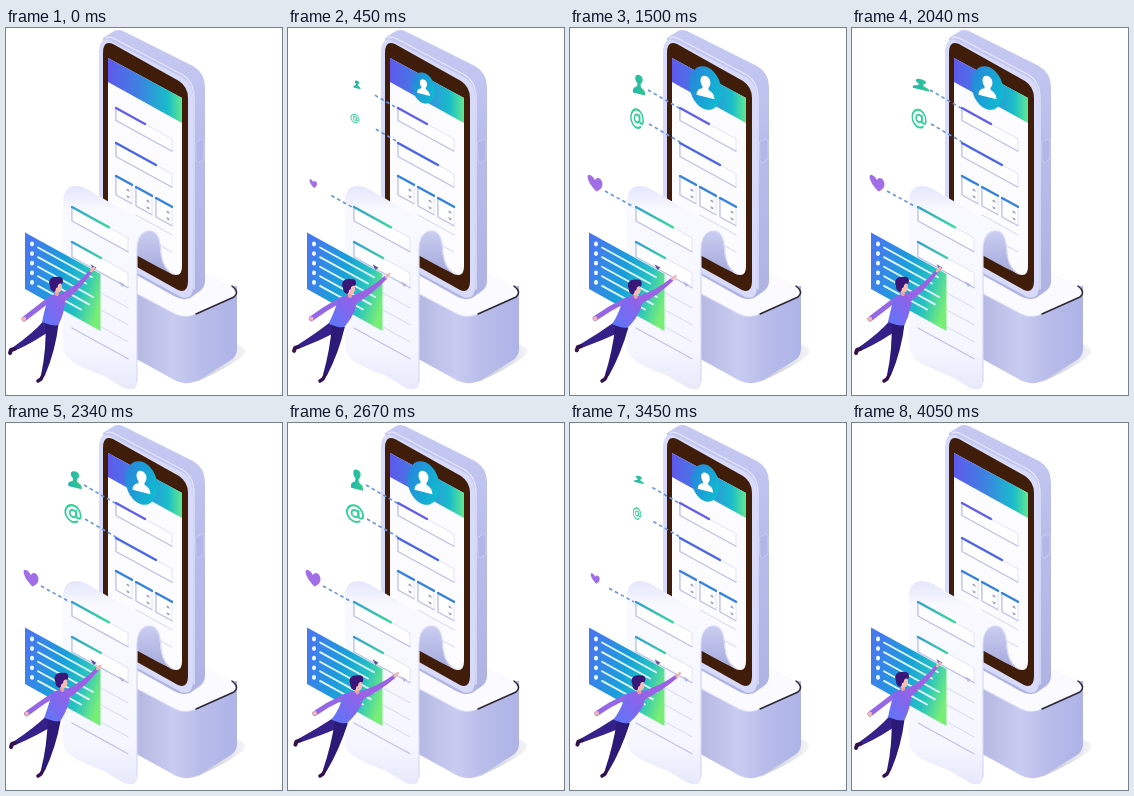
These frames come from a looping animation (276 px wide and 367 px high, 4080 ms). An HTML page:

```html
<!DOCTYPE html>
<html lang="en">
<head>
<meta charset="utf-8">
<title>Filling in a phone form</title>
<style>
  html, body { margin: 0; width: 100%; height: 100%; overflow: hidden; background: #fff; }
  svg { display: block; width: 100%; height: 100%; }
</style>
</head>
<body>
<svg id="stage" viewBox="0 0 276 367" fill="none" stroke-linecap="round" stroke-linejoin="round">
  <defs>
    <linearGradient id="side" x1="0" y1="0" x2="0" y2="1">
      <stop stop-color="#c6caf2"/><stop offset=".4" stop-color="#b9bdec"/><stop offset="1" stop-color="#aeb3e4"/>
    </linearGradient>
    <linearGradient id="header">
      <stop stop-color="#5f58ec"/><stop offset=".45" stop-color="#3a86e0"/>
      <stop offset=".8" stop-color="#18bccb"/><stop offset="1" stop-color="#5fe890"/>
    </linearGradient>
    <linearGradient id="card" x1="0" y1=".3" x2="1" y2=".7">
      <stop stop-color="#4679ef"/><stop offset=".45" stop-color="#189fd9"/>
      <stop offset=".75" stop-color="#27c3c0"/><stop offset="1" stop-color="#78ee76"/>
    </linearGradient>
    <linearGradient id="badge" x1="0" y1="0" x2="1" y2=".5">
      <stop stop-color="#2a80de"/><stop offset="1" stop-color="#10b8d0"/>
    </linearGradient>
    <linearGradient id="boxFace">
      <stop stop-color="#b2b5df"/><stop offset=".4" stop-color="#c9ccf1"/>
      <stop offset=".65" stop-color="#b9bdea"/><stop offset="1" stop-color="#aeb3e8"/>
    </linearGradient>
    <linearGradient id="curl" x1="0" y1="0" x2="0" y2="1">
      <stop stop-color="#cdd0f2"/><stop offset="1" stop-color="#a3a8db"/>
    </linearGradient>
    <linearGradient id="paper" x1="0" y1="0" x2="0" y2="1">
      <stop stop-color="#e4e6fc"/><stop offset=".12" stop-color="#f9f9ff"/>
      <stop offset=".8" stop-color="#f5f6ff"/><stop offset="1" stop-color="#e7e9fb"/>
    </linearGradient>
    <linearGradient id="coat" x1="1" y1="0" x2="0" y2="1">
      <stop stop-color="#9a60e4"/><stop offset=".45" stop-color="#7c69ef"/><stop offset="1" stop-color="#5b78fa"/>
    </linearGradient>
    <linearGradient id="shadow">
      <stop stop-color="#c4c5d0"/><stop offset="1" stop-color="#f4f4f8"/>
    </linearGradient>
    <linearGradient id="userInk">
      <stop stop-color="#1fb5b0"/><stop offset="1" stop-color="#35ca88"/>
    </linearGradient>
    <linearGradient id="ink" gradientUnits="userSpaceOnUse" x1="66" y1="0" x2="103" y2="0">
      <stop stop-color="#309fd0"/><stop offset="1" stop-color="#3cdc9b"/>
    </linearGradient>
  </defs>

  <!-- stand -->
  <path fill="url(#shadow)" d="M190 354L229 316Q241 319 239 325Q232 335 190 354Z"/>
  <path fill="url(#boxFace)" d="M125 258H231V321Q231 328 225 332L196 350Q188 356 178 355Q170 354 163 349L125 328Z"/>
  <path fill="#fbfbff" d="M125 247L190 243Q196 242 202 246L226 258Q234 264 228 269L190 286Q179 291 169 286L125 263Z"/>
  <path stroke="#dcdef8" d="M190 286Q179 291 169 286L130 265"/>
  <path stroke="#2c2734" stroke-width="1.5" d="M226 258Q234 264 228 269L190 286"/>

  <!-- phone -->
  <path fill="url(#side)" d="M97 10L108 3Q112 1 117 3L187 38Q199 45 199 59V253Q199 259 194 263L184 270Q176 273 168 268L100 230Z"/>
  <path fill="#d7daf8" d="M93 25Q93 10 103 12L176 49Q187 55 187 71V258Q187 273 175 269L93 224Z"/>
  <path stroke="#e6e8fc" stroke-width="1.2" d="M100 10Q104 8 109 11L177 47Q188 54 188 70V261"/>
  <path fill="#401d0a" d="M97 25Q97 12 107 16L173 53Q182 59 182 70V253Q182 266 172 262L97 220Z"/>
  <path fill="#fcfcff" d="M102 30L176 70V238Q176 250 166 246L102 211Z"/>
  <path fill="url(#header)" d="M102 30L176 70V95L102 54Z"/>
  <path fill="#b2b6e8" stroke="#c8cbf2" d="M190 114L196 111Q198 111 198 114V131L192 135Q190 135 190 132Z"/>
  <g id="screenForm"></g>

  <!-- paper -->
  <path fill="url(#curl)" d="M130 212Q133 201 144 201Q153 203 154 220Q155 238 167 246Q160 243 154 240L130 227Z"/>
  <path fill="url(#paper)" d="M57 174Q57 158 70 158Q76 158 81 161L149 201Q154 204 155 214Q149 200 139 204Q131 208 131 222V356Q130 364 118 360Q108 354 98 348Q82 342 70 336Q57 329 57 318Z"/>
  <path stroke="#d5d7f5" stroke-width="1.2" d="M131 222V354M131 222Q131 208 139 204Q149 200 153 212Q155 218 155 225Q157 242 167 246"/>
  <g id="paperForm"></g>

  <!-- option list -->
  <path fill="url(#card)" d="M19 204.5L94.500 246V303L19 261Z"/>
  <g id="options"></g>

  <!-- callouts -->
  <g id="leads" stroke="#6595e4" stroke-width="1.6" stroke-dasharray="3.6 3" stroke-linecap="butt"></g>
  <g id="user" fill="url(#userInk)">
    <path d="M0-10C6-10 5-3 2-1V1Q2 3 5 4Q8 6 7 10H-7Q-8 6-5 4Q-2 3-2 1V-1C-5-3-6-10 0-10Z"/>
  </g>
  <g id="at" stroke="#35cf98" stroke-width="2">
    <circle r="3.6"/>
    <path d="M3.6-3.6V1.4a2.4 2.4 0 0 0 4.8 0V0A8.4 8.4 0 1 0 4.8 7"/>
  </g>
  <path id="heart" fill="#a26ee8" d="M0 8C-4 5-8 1-8-4C-8-9-2-9 0-4C2-9 8-9 8-4C8 1 4 5 0 8Z"/>
  <g id="avatar">
    <ellipse rx="16" ry="21.500" fill="url(#badge)"/>
    <path fill="#fff" d="M0-12C6-12 6-4 3-1V1Q9 3 9 9H-9Q-9 3-3 1V-1C-6-4-6-12 0-12Z"/>
  </g>

  <!-- man -->
  <g id="man">
    <path id="backLeg" fill="#35218a"/>
    <path id="frontLeg" fill="#2b1a78"/>
    <path id="backShoe" stroke="#33104f" stroke-width="4"/>
    <path id="frontShoe" stroke="#33104f" stroke-width="3.5"/>
    <path id="farArm" stroke="#9566e6" stroke-width="5"/>
    <path id="torso" fill="url(#coat)"/>
    <path id="nearArm" fill="#9a63e5"/>
    <circle id="farHand" r="2.2" fill="#f4b5ae"/>
    <g id="reach" stroke="#f4b5ae" stroke-width="2.6"><path d="M-2 2L1-1"/></g>
    <g id="head">
      <path stroke="#eaa29e" stroke-width="4" d="M0 4L1 9"/>
      <ellipse cx="1.500" cy="2" rx="4.500" ry="5.500" fill="#f7bdb5"/>
      <path fill="#3a1678" d="M-6 1C-9-6-3-9 2-8C7-9 8-4 6-1C4-2 3-1 2 0Q2 3 0 3Q0 6-2 7C-5 6-6 4-6 1Z"/>
    </g>
  </g>
</svg>
<script>
const LOOP = 4080, STEP = 30, SWAY = 2040, SLOPE = .55;
const $ = id => document.getElementById(id);
const clamp = v => Math.max(0, Math.min(1, v));
const mix = (a, b, k) => a + (b - a) * k;

function add(parent, tag, attrs) {
  const el = document.createElementNS('http://www.w3.org/2000/svg', tag);
  for (const key in attrs) el.setAttribute(key, attrs[key]);
  return $(parent).appendChild(el);
}
// A stroke running along the slanted horizontal axis.
const rule = (parent, x, y, w, stroke, width = 1) =>
  add(parent, 'path', { d: `M${x} ${y}l${w} ${w * SLOPE}`, stroke, 'stroke-width': width });

function field(parent, x, y, w, h, inkWidth, ink) {
  const drop = w * SLOPE;
  add(parent, 'path', { d: `M${x} ${y}l${w} ${drop}v${h}l${-w} ${-drop}Z`, stroke: '#e2e4f6', fill: '#fefeff' });
  add(parent, 'path', { d: `M${x} ${y}v${h}l${w} ${drop}`, stroke: '#bdc1ea', 'stroke-width': 1.2 });
  rule(parent, x, y, inkWidth, ink, 2.4);
}
function triangle(parent, x, y, fill, flip = 1, size = 3) {
  add(parent, 'path', { d: `M${x - size} ${y - size * .55}L${x + size} ${y + size * .55}L${x} ${y + size * 1.3 * flip}Z`, fill });
}

field('screenForm', 110, 80, 56, 12.5, 29, '#615fec');
field('screenForm', 110, 115, 56, 13.5, 40, '#4a66e6');
[110, 130, 150].forEach(x => {
  const y = 148 + (x - 110) * SLOPE;
  field('screenForm', x, y, 16, 19, 16, '#3581e0');
  triangle('screenForm', x + 12, y + 15, '#9a9bb8', -1, 2);
  triangle('screenForm', x + 12, y + 20, '#9a9bb8', 1, 2);
});
rule('screenForm', 130, 187, 36, '#d3d6f3');
rule('screenForm', 146, 213, 20, '#d3d6f3');

field('paperForm', 66, 179, 56, 14, 37, 'url(#ink)');
field('paperForm', 66, 214, 56, 15, 29, 'url(#ink)');
triangle('paperForm', 87.5, 238, '#5a559e');
triangle('paperForm', 116, 255, '#b4b7df');
rule('paperForm', 66, 249, 56, '#d7d9f3');
rule('paperForm', 66, 266, 56, '#d7d9f3');
rule('paperForm', 66, 283, 56, '#d7d9f3');
rule('paperForm', 66, 300, 56, '#bfc2e8', 1.2);

[54, 48, 55, 51, 43].forEach((w, i) => {
  const y = 216 + i * 9.6;
  add('options', 'ellipse', { cx: 26, cy: y, rx: 2, ry: 2.4, fill: '#f1fbff' });
  rule('options', 32, y + 3.5, w, '#e3f8ff', 1.8);
});

const leads = [[109, 80, 78, 62], [110, 114, 79, 96], [64, 179, 35, 163]].map(ends => ({
  ends, el: add('leads', 'path', {})
}));

// Joints as [x, y] when leaning back, then [x, y] at full reach.
const joints = {
  head: [50, 257, 77, 262], neck: [51, 265, 73, 269], shoulder: [59, 268, 83, 272],
  elbow: [70, 262, 100, 268], hand: [87, 241, 119, 256],
  back: [42, 270, 62, 273], farElbow: [31, 281, 45, 282], farHand: [18, 291, 31, 290],
  hip: [43, 297, 54, 301], waist: [53, 296, 64, 300],
  knee: [45, 322, 48, 327], ankle: [37, 347, 37, 347],
  backKnee: [29, 309, 32, 309], backAnkle: [8, 321, 13, 316]
};

const place = (id, x, y, a = 1, b = 0, c = 0, d = 1) =>
  $(id).setAttribute('transform', `matrix(${a} ${b} ${c} ${d} ${x} ${y})`);
const draw = (id, d) => $(id).setAttribute('d', d);

// Outline of a three-joint limb that narrows towards its end.
function limb(points, widths) {
  const left = [], right = [];
  points.forEach(([x, y], i) => {
    const [ax, ay] = points[Math.max(0, i - 1)], [bx, by] = points[Math.min(2, i + 1)];
    const scale = widths[i] / 2 / Math.hypot(bx - ax, by - ay);
    const nx = (ay - by) * scale, ny = (bx - ax) * scale;
    left.push([x + nx, y + ny]);
    right.unshift([x - nx, y - ny]);
  });
  return `M${left[0]}Q${left[1]} ${left[2]}L${right[0]}Q${right[1]} ${right[2]}Z`;
}

// Eases out while appearing and eases in while leaving.
function presence(t, inAt, inLen, outAt, outLen) {
  return (1 - (1 - clamp((t - inAt) / inLen)) ** 2) * (1 - clamp((t - outAt) / outLen) ** 2);
}

function poseMan(t) {
  const k = (1 - Math.cos(2 * Math.PI * t / SWAY)) / 2;
  const p = {};
  for (const name in joints) {
    const [x0, y0, x1, y1] = joints[name];
    p[name] = [mix(x0, x1, k), mix(y0, y1, k)];
  }
  const [hx, hy] = p.hip;
  draw('frontLeg', limb([[hx + 3, hy - 1], p.knee, p.ankle], [13, 9, 4]));
  draw('backLeg', limb([[hx, hy - 1], p.backKnee, p.backAnkle], [12, 8, 4]));
  draw('frontShoe', `M${p.ankle}l-2 4l-3 2`);
  draw('backShoe', `M${p.backAnkle}l-3 1l-1 3`);
  draw('farArm', `M${p.back[0] + 2} ${p.back[1] + 1}L${p.farElbow}L${p.farHand}`);
  draw('nearArm', limb([[p.shoulder[0] - 3, p.shoulder[1] + 2], p.elbow, [p.hand[0] - 2, p.hand[1] + 2]], [9, 5, 3.5]));
  draw('torso', `M${p.back}Q${p.neck[0] - 2} ${p.neck[1] - 2} ${p.shoulder}` +
    `Q${p.shoulder[0] + 1} ${p.shoulder[1] + 13} ${p.waist}Q${p.waist[0] - 2} ${p.waist[1] + 4} ${hx - 7} ${hy - 3}` +
    `Q${p.back[0] - 4} ${p.back[1] + 14} ${p.back}Z`);
  place('farHand', ...p.farHand);
  place('reach', ...p.hand);
  place('head', ...p.head);
}

function render(t) {
  poseMan(t);
  const badge = presence(t, 180, 580, 3220, 610);
  const icon = presence(t, 300, 500, 3150, 480);
  const stretch = Math.abs(Math.sin(Math.PI * (t - 680) / 1360));
  const spin = Math.cos(2 * Math.PI * (t - 600) / SWAY);

  place('avatar', 135.5, 60, badge, badge * .25, 0, badge);
  leads.forEach(({ ends: [x0, y0, x1, y1], el }) => {
    el.setAttribute('d', `M${mix(x1, x0, 1 - badge)} ${mix(y1, y0, 1 - badge)}L${x0} ${y0}`);
    el.setAttribute('visibility', badge > .01 ? 'visible' : 'hidden');
  });

  const userW = icon * (1.15 - .32 * stretch);
  place('user', 69, 56.5, userW, userW * .25, 0, icon * (.52 + .46 * stretch));
  const atW = icon * (.84 + .12 * spin);
  place('at', 67, 90.5, atW, atW * .25, 0, icon * (1.02 - .06 * spin));
  place('heart', 25.5, 156, icon * .92, icon * .35, icon * .12, icon * .95);
}

function tick(now) {
  render(Math.floor((now % LOOP) / STEP) * STEP);
  requestAnimationFrame(tick);
}
render(0);
requestAnimationFrame(tick);
</script>
</body>
</html>
```
